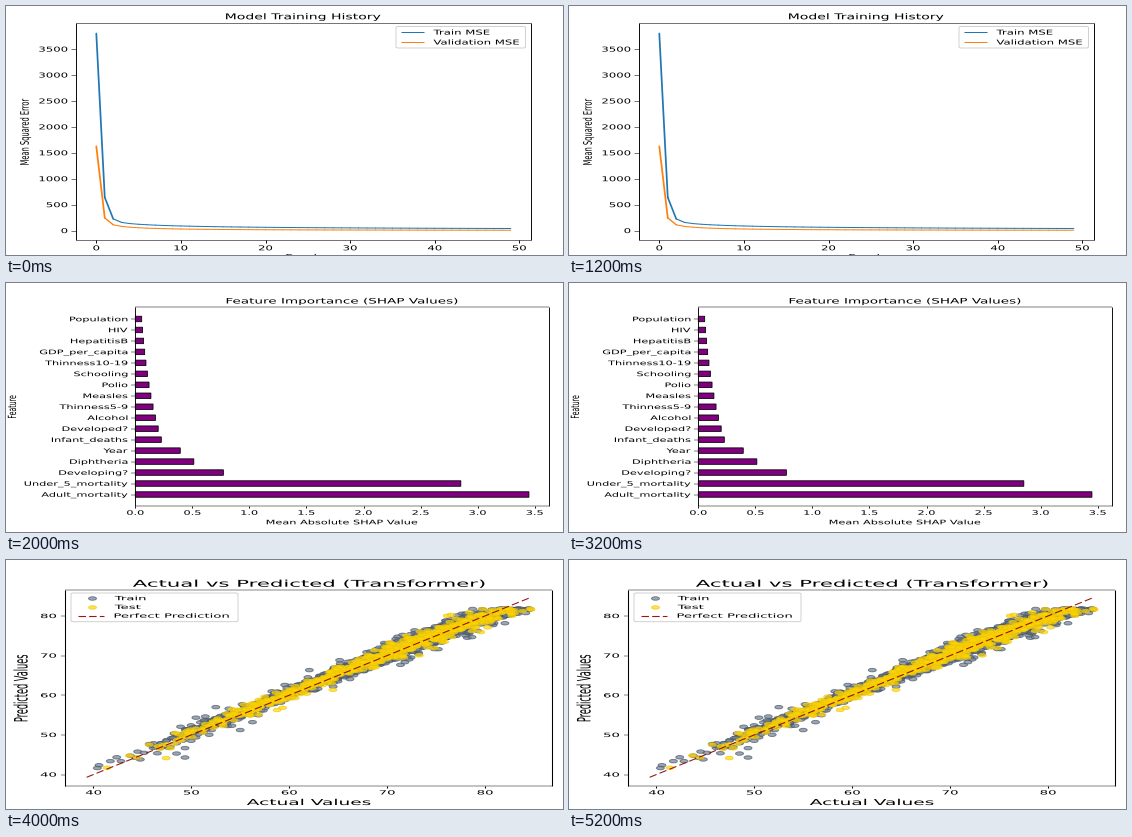
A matplotlib script that plays this animation: 557 by 249 pixels, repeating every 6 s.

```python
import numpy as np
import matplotlib.pyplot as plt
from matplotlib.animation import FuncAnimation
from matplotlib.collections import EllipseCollection, LineCollection
from matplotlib.patches import FancyBboxPatch, PathPatch, Rectangle
from matplotlib.textpath import TextPath
from matplotlib.transforms import Affine2D

plt.rcParams["font.family"] = "DejaVu Sans"

W, H, DPI = 557, 249, 64
PX = 72 / DPI  # one pixel in points
BLUE, ORANGE = "#1f77b4", "#ff7f0e"
SLATE, SLATE_EDGE = (0.44, 0.50, 0.58, 0.7), (0.28, 0.32, 0.38, 0.7)
GOLD, GOLD_EDGE = (1.0, 0.84, 0.0, 0.7), (0.93, 0.78, 0.05, 0.7)

fig = plt.figure(figsize=(W / DPI, H / DPI), dpi=DPI, facecolor="white")


class Chart:
    """A plot in pixel coordinates; sx, sy are pixels per typographic point."""

    def __init__(self, sx, sy, box, xmap, ymap):
        self.sx, self.sy, self.box = sx, sy, box
        self.xmap, self.ymap = xmap, ymap  # (pixel of zero, pixels per unit)
        self.ax = fig.add_axes([0, 0, 1, 1])
        self.ax.set(xlim=(0, W), ylim=(H, 0))
        self.ax.axis("off")

    def x(self, v):
        return self.xmap[0] + self.xmap[1] * np.asarray(v, float)

    def y(self, v):
        return self.ymap[0] - self.ymap[1] * np.asarray(v, float)

    def text(self, x, y, s, size=10, align=0.5, rot=0):
        path = TextPath((0, 0), s, size=size)
        ext = path.get_extents()
        shift = ext.x0 + align * ext.width
        place = (Affine2D().translate(-shift, 0).rotate_deg(rot)
                 .scale(self.sx, -self.sy).translate(x, y))
        self.ax.add_patch(PathPatch(path.transformed(place), fc="black",
                                    lw=0, zorder=8))

    def line(self, xs, ys, color="black", width=0.8, zorder=5, cap="butt"):
        """Stroke whose weight follows the chart's uneven scale."""
        pts = np.column_stack([xs, ys]).astype(float)
        d = np.diff(pts, axis=0)
        ratio = (np.hypot(d[:, 0] / self.sx, d[:, 1] / self.sy)
                 / np.hypot(d[:, 0], d[:, 1]))
        self.ax.add_collection(LineCollection(
            np.stack([pts[:-1], pts[1:]], axis=1), colors=color,
            linewidths=width * self.sx * self.sy * ratio * PX,
            capstyle=cap, zorder=zorder), autolim=False)

    def frame(self):
        x0, y0, x1, y1 = self.box
        for y in (y0, y1):
            self.line((x0, x1), (y, y))
        for x in (x0, x1):
            self.line((x, x), (y0, y1))

    def xticks(self, values, base, form="{}"):
        bottom = self.box[3]
        for v in values:
            px = float(self.x(v))
            self.line((px, px), (bottom, bottom + 3.5 * self.sy))
            self.text(px, base, form.format(v))

    def yticks(self, values, labels=None):
        left = self.box[0]
        for v, s in zip(values, labels or values):
            py = float(self.y(v))
            self.line((left - 3.5 * self.sx, left), (py, py))
            self.text(left - 7 * self.sx, py + 3.7 * self.sy, str(s), align=1)

    def titles(self, title, xlabel, ylabel, xbase, ybase, size=10, big=12):
        x0, y0, x1, y1 = self.box
        mid = (x0 + x1) / 2
        self.text(mid, y0 - 6 * self.sy, title, big)
        self.text(mid, xbase, xlabel, size)
        self.text(ybase, (y0 + y1) / 2, ylabel, size, rot=90)

    def legend_box(self, x0, y0, x1, y1):
        self.ax.add_patch(FancyBboxPatch(
            (x0, y0), x1 - x0, y1 - y0, fc=(1, 1, 1, 0.8), ec="#cccccc",
            boxstyle="round,pad=0,rounding_size=2.3",
            mutation_aspect=self.sy / self.sx, lw=0.9 * PX, zorder=6))

    def dots(self, xs, ys, face, edge, zorder=2):
        n = len(xs)
        self.ax.add_collection(EllipseCollection(
            np.full(n, 6 * self.sx), np.full(n, 6 * self.sy), np.zeros(n),
            units="xy", offsets=np.column_stack([xs, ys]),
            offset_transform=self.ax.transData, facecolors=face,
            edgecolors=edge, linewidths=0.9 * PX, zorder=zorder),
            autolim=False)


def history():
    c = Chart(1.168, 0.67, (69.5, 17.3, 525, 234.3), (90.3, 8.46),
              (224.6, 0.05186))
    t = np.arange(50)
    train = 3490 * np.exp(-2.11 * t) + 310 * (1 + t) ** -0.52
    valid = 1325 * np.exp(-2.69 * t) + 300 * (1 + t) ** -0.95
    c.legend_box(390, 20.4, 519.5, 42)
    for mid, name, color, mse in ((26.2, "Train MSE", BLUE, train),
                                  (36.1, "Validation MSE", ORANGE, valid)):
        c.line(c.x(t), c.y(mse), color, 1.5, 3, "round")
        c.line((395, 418), (mid, mid), color, 1.5, 7)
        c.text(427.5, mid + 2.4, name, align=0)
    c.frame()
    c.xticks(range(0, 51, 10), 244.3)
    c.yticks(range(0, 3501, 500))
    c.titles("Model Training History", "Epoch", "Mean Squared Error",
             253, 22.7)
    return c


def importance():
    names = ("Adult_mortality Under_5_mortality Developing? Diphtheria Year "
             "Infant_deaths Developed? Alcohol Thinness5-9 Measles Polio "
             "Schooling Thinness10-19 GDP_per_capita HepatitisB HIV "
             "Population").split()
    leaders = [3.45, 2.853, 0.772, 0.513, 0.394]
    values = np.append(leaders, np.geomspace(0.228, 0.056, 12))
    c = Chart(1.13, 0.62, (129.3, 24.2, 542.7, 223.3), (129.3, 114.1),
              (211.5, 10.97))
    for row, value in enumerate(values):
        c.ax.add_patch(Rectangle(
            (c.box[0], float(c.y(row + 0.25))), value * c.xmap[1],
            0.5 * c.ymap[1], fc="purple", ec="black", lw=0.8 * PX,
            snap=False, zorder=2))
    c.frame()
    c.xticks(np.arange(0, 3.6, 0.5), 231.8, "{:.1f}")
    c.yticks(range(len(names)), names)
    c.titles("Feature Importance (SHAP Values)", "Mean Absolute SHAP Value",
             "Feature", 241.3, 10)
    return c


def sample(rng, n):
    """Ages with a long lower tail and predictions that level off at the top."""
    low = rng.random(n) < 0.36
    age = np.where(low, rng.normal(59.5, 7, n), rng.normal(73.5, 5.3, n))
    age = age[(age > 39.3) & (age < 84.7)]
    k = len(age)
    trend = (age + 0.5 + 3.5 * np.exp((39 - age) / 2)
             - 3.8 * np.exp((age - 85) / 3.5))
    spread = 0.8 + 0.2 * np.cos(2 * np.pi * (age - 46) / 29)
    guess = trend + spread * rng.standard_t(7, k)
    return age, np.minimum(guess, 81.9 - 0.3 * rng.random(k))


def prediction():
    c = Chart(1.325, 0.583, (59.3, 30.2, 546, 226), (-304.1, 9.79),
              (373.1, 3.965))
    rng = np.random.default_rng(7)
    c.legend_box(65, 33, 232, 61.7)
    for mid, name, n, face, edge in (
            (38.1, "Train", 2300, SLATE, SLATE_EDGE),
            (46.9, "Test", 700, GOLD, GOLD_EDGE)):
        age, guess = sample(rng, n)
        c.dots(c.x(age), c.y(guess), face, edge)
        c.dots([85.5], [mid], face, edge, 7)
        c.text(108.7, mid + 2.1, name, align=0)
    dash = dict(color="darkred", lw=1.1 * PX, dashes=(6.8, 2.9), alpha=0.9)
    ends = [39.3, 84.7]
    c.ax.plot(c.x(ends), c.y(ends), zorder=4, **dash)
    c.ax.plot((72, 98), (55.6, 55.6), zorder=7, **dash)
    c.text(108.7, 57.7, "Perfect Prediction", align=0)
    c.frame()
    c.xticks(range(40, 81, 10), 234.5)
    c.yticks(range(40, 81, 10))
    c.titles("Actual vs Predicted (Transformer)", "Actual Values",
             "Predicted Values", 245, 21.5, size=14, big=16)
    return c


charts = [history(), importance(), prediction()]


def show(i):
    for k, chart in enumerate(charts):
        chart.ax.set_visible(k == i)
    return []


anim = FuncAnimation(fig, show, frames=len(charts), interval=2000,
                     init_func=lambda: show(0), repeat=True, repeat_delay=0)
plt.show()
```
